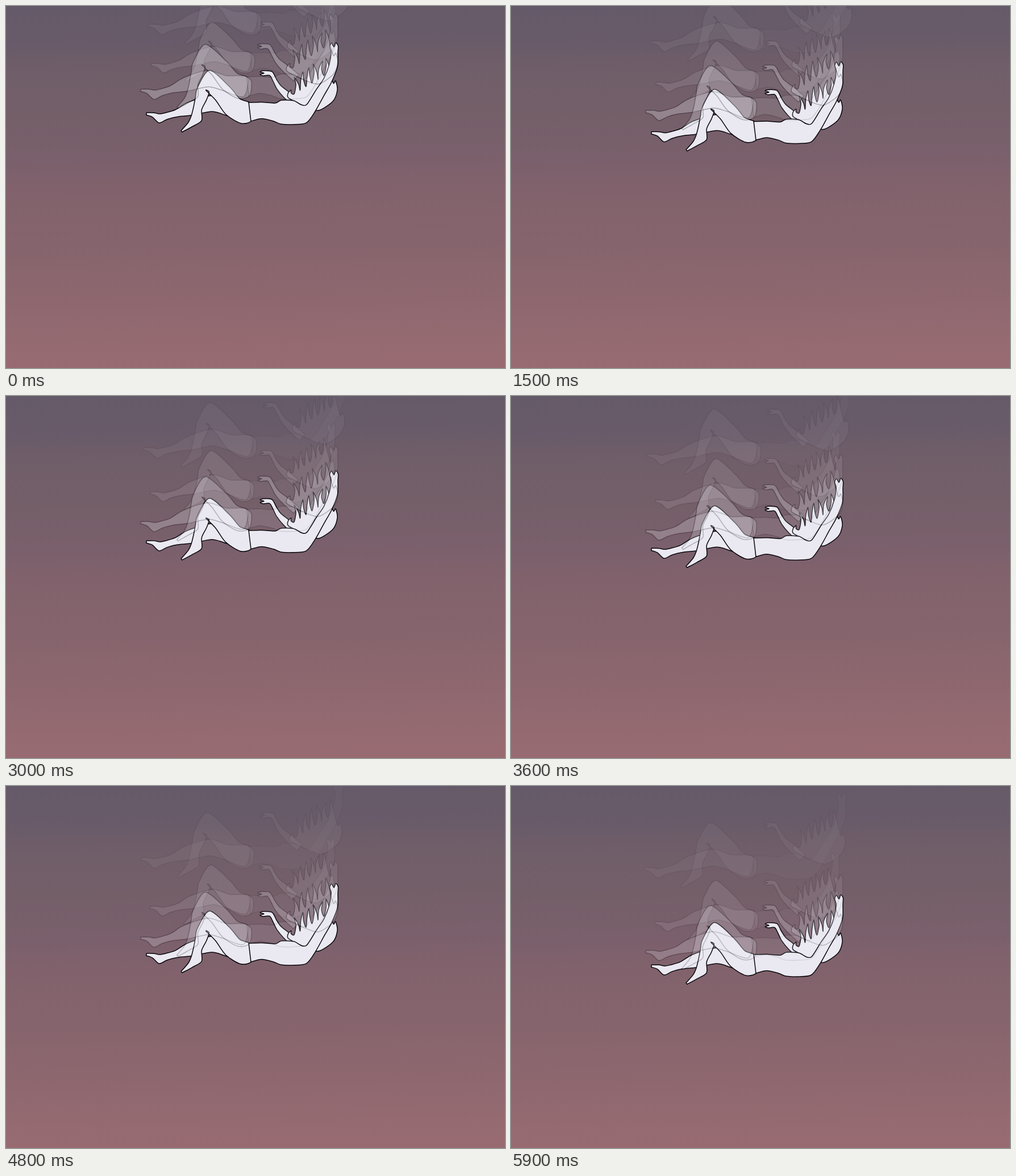
An HTML page that plays this animation: 878x638 px, repeating every 6 s.

```html
<!DOCTYPE html>
<html lang="en">
<head>
<meta charset="utf-8">
<title>Falling</title>
<style>
  html, body { margin: 0; width: 100%; height: 100%; overflow: hidden; }
  body {
    background: linear-gradient(179deg, #655a69 0%, #695b69 11%, #6f5e69 17%, #745f69 30%,
      #7a606c 42%, #81626c 50%, #86646d 65%, #8d676e 78%, #946a71 90%, #986b71 100%);
  }
  svg { display: block; width: 878px; height: 638px; }
  path { fill: #eae8f1; stroke: #08060a; stroke-width: 1.5; stroke-linejoin: round; }
</style>
</head>
<body>
<svg id="stage" viewBox="0 0 878 638"></svg>
<script>
const LOOP = 6000, STEP = 100;
const TOE = [247, 189];

const mix = (a, b, k) => a.map((v, i) => v + (b[i] - v) * k);

// Smooth curve through the points, closed by a straight line
function curve(pts) {
  const last = pts.length - 1;
  const at = i => pts[Math.max(0, Math.min(last, i))];
  const handle = (i, dir) =>
    at(i).map((v, k) => (v + dir * (at(i + 1)[k] - at(i - 1)[k]) / 7).toFixed(1));
  let d = "M" + pts[0];
  for (let i = 0; i < last; i++) d += `C${handle(i, 1)} ${handle(i + 1, -1)} ${at(i + 1)}`;
  return d + "Z";
}

// A limb is a spine of [x, y, half width]; its end may split into fingers
function limb(spine, fingers = 0) {
  const left = [], right = [];
  let dir;
  spine.forEach(([x, y, r], i) => {
    const a = spine[Math.max(0, i - 1)], b = spine[Math.min(spine.length - 1, i + 1)];
    const dx = b[0] - a[0], dy = b[1] - a[1], len = Math.hypot(dx, dy);
    dir = [dx / len, dy / len];
    left.push([x + dir[1] * r, y - dir[0] * r]);
    right.unshift([x - dir[1] * r, y + dir[0] * r]);
  });
  const cap = [];
  for (let i = 1; i < 2 * fingers; i++) {
    const reach = i % 2 ? 6 : -1;
    cap.push(mix(left.at(-1), right[0], i / (2 * fingers)).map((v, k) => v + dir[k] * reach));
  }
  return curve([...left, ...cap, ...right]);
}

// Swaying strands rise from the scalp, then the outline closes around the head
function hair(strands) {
  const root = i => [496.5 + 10.5 * i, 161.5 - 6.5 * i];
  const pts = [[515, 172], root(0)];
  for (let i = 0; i < strands; i++) {
    const sway = 3 * Math.sin(2.4 * i + 2);
    const tip = [499 + 11 * i + sway, 148 - 56 * Math.sqrt(i / (strands - 1))];
    const [x, y] = mix(mix(root(i), root(i + 1), .5), tip, .5);
    pts.push([x - 2.5 - sway, y], tip, [x + 2.5 - sway, y], root(i + 1));
  }
  return curve([...pts, [576, 136], [580, 132], [583, 148], [575, 168], [550, 184], [528, 178]]);
}

// Back to front; weight scales the opacity of the trailing copies
const parts = [
  { d: limb([[512, 173, 7], [493, 156, 6.5], [480, 143, 4.5], [473, 131, 3.5], [466, 119, 4],
      [453, 118.5, 4.5]], 2), weight: 1 },
  { d: hair(7), weight: 1 },
  { d: limb([[247, 190, 2], [259, 192, 4], [270, 198, 8], [282, 194, 6], [300, 189, 6.5],
      [324, 181, 12], [362, 172, 14], [390, 180, 13], [425, 187, 17]]), weight: 1 },
  { d: limb([[309, 221, 1.5], [324, 209, 5], [335, 198, 10], [337, 181, 7.5], [343, 163, 10],
      [347, 148, 11], [355, 131, 18], [381, 154, 17], [399, 177, 18.5], [420, 188, 20],
      [434, 190, 12]]), weight: 1 },
  { d: limb([[429, 186.5, 16.5], [450, 184, 14.5], [472, 187, 16], [484, 187, 21], [505, 188, 21],
      [524, 190, 16.5], [537, 179, 9.5], [553, 152, 8.5], [566, 131, 7.5], [576, 105, 7.5],
      [578, 82, 6], [577, 71, 7.5]], 2), weight: .42 }
];

// Toe position, scale and strength at time t, in seconds
const layers = [
  t => ({ x: 247, y: 189 + 22.3 * Math.min(t, 5.7), size: 1, turn: 0, alpha: 1 }),
  t => ({ x: 255.5 - .45 * t, y: 102 + 21.8 * t + .27 * t * t, size: .965, turn: -.4, alpha: .115 - .003 * t }),
  t => ({ x: 250 - 2.7 * t, y: 33 + 19.6 * Math.min(t, 5.7), size: 1.055, turn: -.3, alpha: .06 - .003 * t }),
  t => ({ x: 237, y: 147.5 + 24.9 * Math.min(t, 5.75), size: 1.034, turn: -.9, alpha: .29 - .014 * t })
];

const svgNode = (name, parent) =>
  parent.appendChild(document.createElementNS("http://www.w3.org/2000/svg", name));

const figures = layers.map(pose => {
  const group = svgNode("g", stage);
  const paths = parts.map(({ d, weight }) => {
    const node = svgNode("path", group);
    node.setAttribute("d", d);
    return { node, weight };
  });
  return { pose, group, paths };
});

function draw(ms) {
  const t = Math.floor(ms % LOOP / STEP) * STEP / 1000;
  for (const { pose, group, paths } of figures) {
    const { x, y, size, turn, alpha } = pose(t);
    group.setAttribute("transform",
      `translate(${x} ${y}) rotate(${turn}) scale(${size}) translate(${-TOE[0]} ${-TOE[1]})`);
    for (const { node, weight } of paths)
      node.setAttribute("opacity", alpha === 1 ? 1 : alpha * weight);
  }
}

const start = performance.now();
function tick() {
  draw(performance.now() - start);
  requestAnimationFrame(tick);
}
tick();
</script>
</body>
</html>
```
